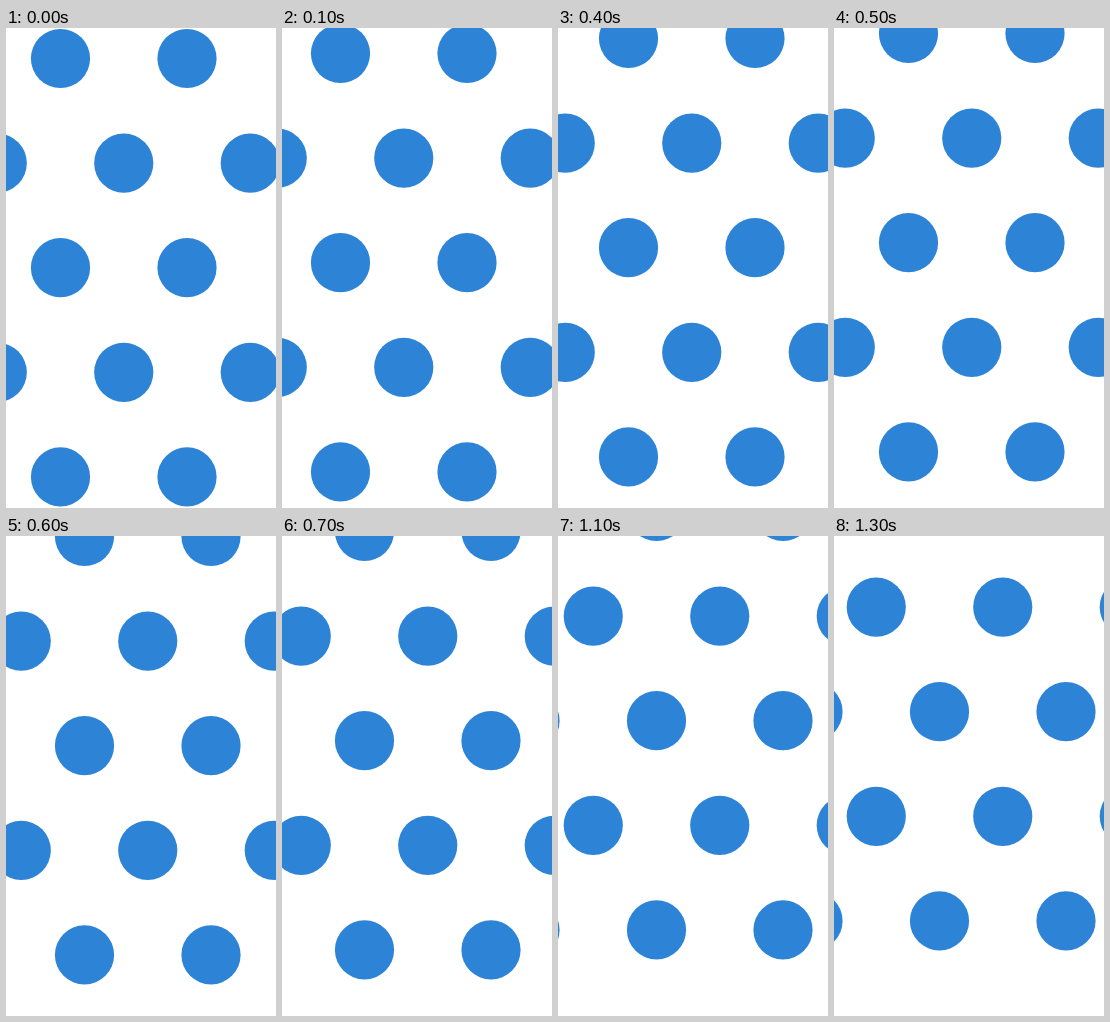
These frames come from a looping animation (270 by 480 pixels, 1.4 s). An HTML page:

```html
<!DOCTYPE html>
<html lang="en">
<head>
<meta charset="utf-8">
<title>Drifting discs</title>
<style>
  html, body { margin: 0; width: 100%; height: 100%; overflow: hidden; background: #fff; }
  svg { display: block; width: 100vw; height: 100vh; }
</style>
</head>
<body>
<svg viewBox="0 0 270 480"><g id="discs" fill="#2d84d7"></g></svg>
<script>
  const LOOP = 1400, STEPS = 14;
  const GAP_X = 126.5, GAP_Y = 104.6, RADIUS = 29.6;
  const discs = document.getElementById('discs');

  function addDisc(x, y) {
    const disc = document.createElementNS('http://www.w3.org/2000/svg', 'circle');
    disc.setAttribute('cx', x);
    disc.setAttribute('cy', y);
    disc.setAttribute('r', RADIUS);
    discs.append(disc);
  }

  // Five rows; every second one is shifted by half a column.
  for (let row = 0; row < 5; row++) {
    const shift = row % 2 ? -GAP_X / 2 : 0;
    for (let col = -1; col < 3; col++) {
      addDisc(54.5 + shift + col * GAP_X, 30.5 + row * GAP_Y);
    }
  }

  // Even steps up and to the right, with a slightly shorter last one.
  const frames = [];
  for (let i = 0; i <= STEPS; i++) {
    const x = Math.min(i * 4, 51), y = Math.max(i * -5, -64);
    frames.push({
      offset: i / STEPS,
      transform: `translate(${x}px, ${y}px)`,
      easing: 'step-end'
    });
  }
  discs.animate(frames, { duration: LOOP, iterations: Infinity });
</script>
</body>
</html>
```
